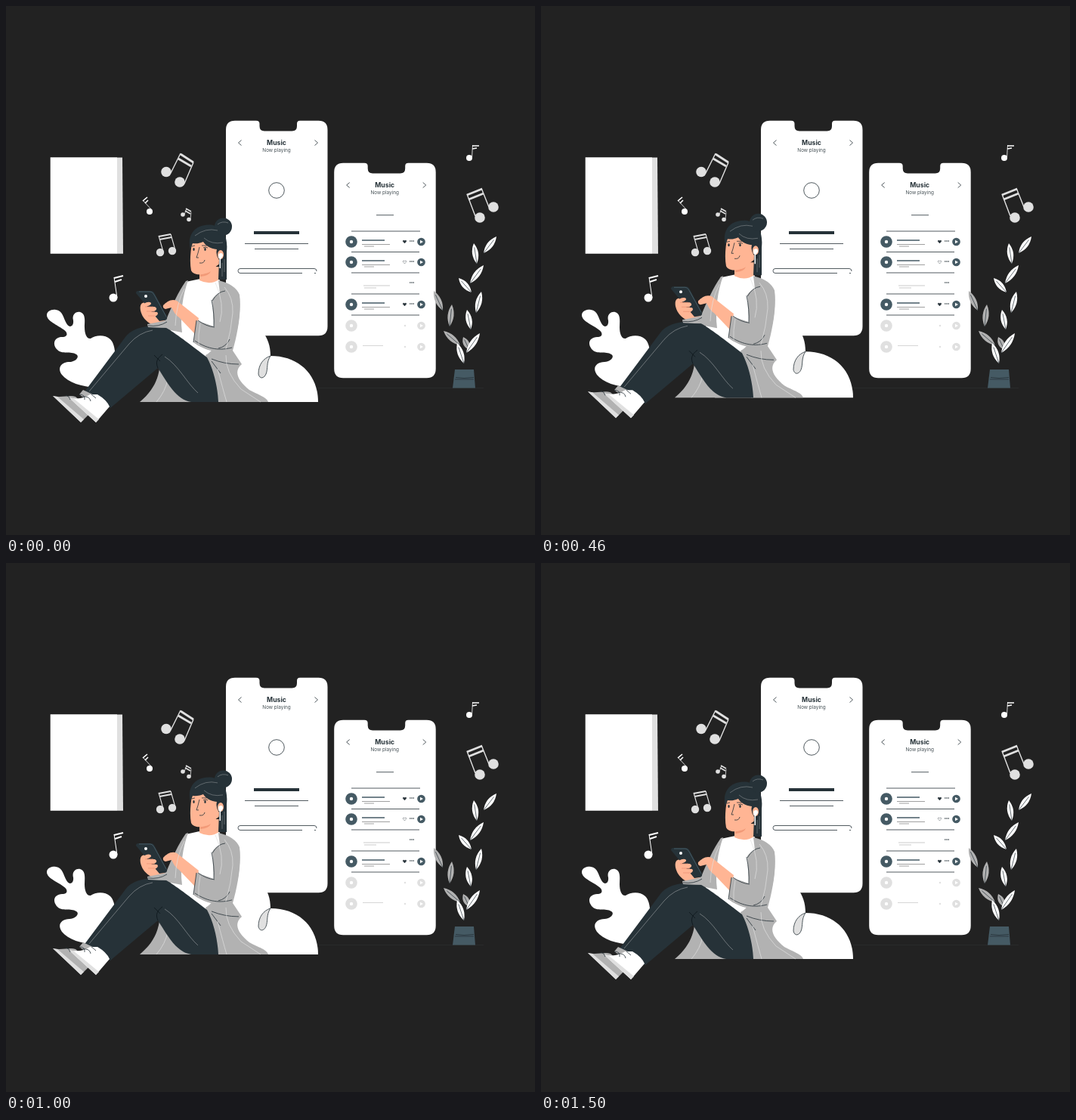
Write an HTML page that moves like this. It is 700 by 700 pixels and loops after 1.54 s.

```html
<!DOCTYPE html>
<html lang="en">
<head>
<meta charset="utf-8">
<style>
  html, body { margin: 0; width: 100%; height: 100%; overflow: hidden; background: #222; }
  svg { display: block; width: 100vw; height: 100vh; }
  text { font-family: Inter, "Open Sans", sans-serif; text-anchor: middle; fill: #263238; }
  .line { fill: none; stroke: #263238; stroke-width: .8; }
  .light { fill: none; stroke: #e0e0e0; stroke-width: .7; }
  .white { fill: #fff; }
  .pale { fill: #e0e0e0; }
  .gray { fill: #b2b2b2; }
  .dark { fill: #263238; }
  .skin { fill: #ffb594; }
</style>
</head>
<body>
<svg viewBox="0 0 700 700">
  <defs>
    <g id="phone">
      <path class="white" d="M303 151.800H331Q335.500 151.800 335.500 156V159Q335.500 165.500 342 165.500H378.500Q385 165.500 385 159V156Q385 151.800 389 151.800H413.500Q425.500 151.800 425.500 164V424Q425.500 436.200 413.500 436.200H303Q291 436.200 291 424V164Q291 151.800 303 151.800Z"/>
      <text x="358" y="184.100" font-size="8.700" font-weight="700">Music</text>
      <text x="358" y="192.500" font-size="6.400" fill-opacity=".85">Now playing</text>
      <path class="line" d="M311.500 177.500L307.500 181L311.500 184.500M408.500 177.500L412.500 181L408.500 184.500"/>
    </g>
  </defs>

  <path class="white" d="M58.700 200.300H147V327.700H58.700Z"/>
  <path class="pale" d="M147 200.500H154L155 327.700H147Z"/>
  <path d="M413 505.500H632" stroke="#2b2d2e" stroke-width=".8"/>

  <use href="#phone"/>
  <circle class="line" cx="358" cy="244" r="10.300"/>
  <path class="dark" d="M328 298H388V302H328Z"/>
  <path class="line" d="M316 314.500H400M329 321.500H387M392 353.500H310A3 3 0 0 1 310 347.500H408Q411 347.500 411 351M408 353.500H410"/>

  <use href="#phone" x="143.200" y="56"/>
  <path class="line" d="M490 276.700H513M457 298H548M457 325.500H547M457 353H547M457 381H547M457 409H547"/>
  <g id="rows"></g>

  <g id="notes"></g>
  <g id="leaves"></g>
  <path fill="#455a64" d="M594 481H619L621 505.500H591Z"/>
  <path class="line" d="M595 491.500L606 492.500L619 491.500M594 494H619"/>

  <path class="white" d="M66 402C75 403 76 413 80 420C84 427 90 424 89 416C87 409 92 404 98 405C106 407 104 418 104 425C104 434 107 441 112 440C118 436 130 434 138 441C146 449 146 470 140 485L120 505C100 504 82 498 74 488C67 478 74 471 84 471C92 471 98 464 93 461C86 456 74 462 67 454C60 445 66 437 76 438C82 437 82 432 76 428C68 422 54 417 54 409C54 404 60 401 66 402Z"/>

  <g id="listener">
    <path class="white" d="M300 385C337 425 350 437 350 463C388 463 413 488 413 524H230Z"/>
    <path class="pale" d="M350 463C341 466 334 474 334 487C336 495 342 492 344 487C347 480 344 472 350 463Z"/>
    <path class="line" d="M350 463C341 466 334 474 334 487C336 495 342 492 344 487C347 480 344 472 350 463"/>

    <path class="gray" d="M177 524C190 513 200 500 203 480L245 524Z"/>
    <path class="light" d="M199 524Q211 510 214 494"/>
    <path class="white" d="M238 365L257 361H282L292 385L285 480L215 440Q226 395 238 365Z"/>
    <path class="gray" d="M238 364C228 378 219 398 212 415L190 422V427L212 428L233 432C230 408 234 382 241 363Z"/>
    <path class="gray" d="M281 363Q303 368 309 382C312 405 306 435 300 456L312 474C300 484 308 497 322 508C332 514 345 517 347 524H278L264 462C288 450 286 400 281 363Z"/>

    <path class="dark" d="M102 513L158 438C166 426 188 421 208 424C218 428 244 448 266 465C275 482 280 504 281 524H245C225 521 214 499 201 479L138 532Z"/>
    <path class="light" opacity=".55" d="M110 510L163 447Q176 432 194 429M210 464C228 475 240 500 254 512"/>
    <path fill="none" stroke="#111b20" d="M201 479C198 472 199 467 207 461M204 470L196 462"/>

    <path class="gray" d="M62 516C74 519 84 514 92 517L114 536L99 551Z"/>
    <path class="pale" d="M62 516L68 517L103 547L99 551Z"/>
    <path class="gray" d="M97 514L102 508L117 515L108 522Z"/>
    <path class="white" d="M83 518C94 521 104 519 111 514H121Q133 521 137 530L119 551Z"/>
    <path class="pale" d="M83 518L89 519L123 547L119 551Z"/>
    <path class="line" d="M79 515Q84 516 85 521M97 514Q105 514 104 521M101 517Q111 516 112 523M113 514L119 519"/>

    <path class="skin" d="M256 345H282V362Q270 370 256 363Z"/>
    <path fill="#f29a78" d="M257 354Q265 355 271 351Q269 357 257 358Z"/>
    <path class="skin" d="M247 308Q242 335 245 350C249 358 264 356 271 350L284 340V312L268 302Z"/>
    <path class="dark" d="M244 322C239 303 250 289 270 289.500C288 291 294 306 292 325V362H281L282 336Q277 329 279 322C270 321 264 317 261 312Q254 315 247 314Z"/>
    <circle class="dark" cx="287.500" cy="292" r="11.500"/>
    <path class="light" opacity=".45" d="M250 304Q264 293 280 297M262 307Q272 316 287 313M280 289Q286 284 294 287M286 340V358M289 335V352"/>
    <ellipse class="skin" cx="284" cy="329" rx="4" ry="6"/>
    <path class="white" d="M281.500 328Q287 325 287 331L284 335L281 333Z"/>
    <path class="white" d="M282.500 333H284V347H282.500Z"/>
    <path class="line" d="M256 319Q254 328 252 333H255M256 340Q262 341 263 336M246 318L250 317M259 317L266 317"/>
    <ellipse class="dark" cx="248.500" cy="322" rx="1.200" ry="2"/>
    <ellipse class="dark" cx="263.500" cy="322" rx="1.200" ry="2"/>
    <path class="line" d="M261 320Q264 318 267 320"/>

    <path class="skin" d="M178 403Q176 392 185 392L198 399L211 416L198 424Q181 417 178 403Z"/>
    <path class="dark" d="M175 377H192Q195 377 197 381L213 411Q214 415 210 416L203 417L172 380Q172 377 175 377Z"/>
    <path fill="none" stroke="#455a64" d="M176 378H191Q194 378 196 382L212 411"/>
    <circle class="white" cx="185" cy="384" r="2"/>
    <path class="skin" d="M178 399Q184 390 191 392Q195 395 185 398L197 398Q202 401 196 404H187L200 405Q203 408 197 411L203 418L194 420Q181 414 178 399Z"/>
    <path fill="none" stroke="#e88f70" stroke-width=".7" d="M184 398L195 398M186 404H197M188 410H197"/>
    <path class="gray" d="M187 421Q198 419 212 416L218 426Q202 426 188 425Z"/>
    <path class="line" d="M188 423Q202 425 213 418"/>

    <path class="skin" d="M208 396C213 391 219 387 226 390L255 413L250 434L229 412C222 407 221 402 219 399L211 401Q207 400 208 396Z"/>
    <path class="gray" d="M273 388C283 373 306 372 309 385C311 415 304 441 297 454C278 463 257 452 248 445L252 416L275 424Z"/>
    <path class="line" d="M252 416L248 445M254 416Q265 424 276 425M275 424Q276 408 272 389M250 443C268 455 284 456 299 452M281 453Q291 451 296 441M272 467Q289 474 308 474M272 470L284 486M273 390Q280 378 290 377"/>
    <path class="light" d="M257 420Q254 436 255 448M289 372Q301 386 300 406Q298 430 291 454M291 462Q290 485 311 507L337 524M280 480Q287 507 292 524M236 374Q225 395 224 423M277 366Q290 395 283 418"/>
  </g>
</svg>
<script>
const el = id => document.getElementById(id);
const circle = (x, y, r, fill) => `<circle cx="${x}" cy="${y}" r="${r}" fill="${fill}"/>`;
const stroke = (d, color, width) => `<path d="${d}" fill="none" stroke="${color}" stroke-width="${width}"/>`;

// Track list row: liked, plain, empty or faded
function row(y, kind) {
  const color = kind === 'faded' ? '#e0e0e0' : '#455a64';
  let out = '';
  if (kind !== 'empty') {
    out += circle(457, y, 7.8, color) + circle(457, y, 2.2, '#fff') + circle(549.5, y, 5.3, color)
      + `<path class="white" d="M548 ${y - 2.3}L552 ${y}L548 ${y + 2.3}Z"/>`;
  }
  if (kind === 'faded') return out + circle(528, y, 1.2, color);
  out += [534.8, 537, 539.2].map(x => circle(x, y - 1, .8, '#263238')).join('');
  if (kind === 'empty') return out + stroke(`M473 ${y + 3}H508M474 ${y + 6}H490`, '#aaa', .6);
  return out + stroke(`M471 ${y - 2}H501`, color, 1.5)
    + stroke(`M471 ${y + 3.5}H508M474 ${y + 6}H487`, '#777', .7)
    + `<path d="M527.500 ${y + 2}l-2.300-2.600q0-2.400 2.300-.8q2.300-1.600 2.300 .8Z"
        fill="${kind === 'liked' ? '#263238' : '#fff'}" stroke="#263238" stroke-width=".4"/>`;
}
el('rows').innerHTML = row(312, 'liked') + row(339, 'plain') + row(367, 'empty')
  + row(395, 'liked') + row(423, 'faded') + row(451, 'faded')
  + stroke('M472 449.5H499', '#ccc', .8);

function note(heads, r, color, stems, beams, width) {
  return heads.map(([x, y]) => circle(x, y, r, color)).join('')
    + stroke(stems, color, width) + stroke(beams, color, width * 2);
}
el('notes').innerHTML =
  note([[212, 219.5], [230, 233]], 6.8, '#e0e0e0', 'M218 221L231 195M236 235L248 207', 'M231 196L248 207M228 202L245 212', 1.4)
  + note([[190, 272]], 4, '#fff', 'M193 270L181 257', 'M181 258L187 253M184 261L188 257', .8)
  + note([[234, 276], [242, 282.5]], 2.8, '#e0e0e0', 'M236 276L239 268M244 282L245 273', 'M238 268L245 272M237 271L244 275', .8)
  + note([[204, 326], [220, 324]], 5.2, '#e0e0e0', 'M208 325L202 304M224 323L218 302', 'M202 305L218 302M203 309L219 306', 1.1)
  + note([[142, 386]], 5.5, '#fff', 'M147 386L143 359', 'M143 360L155 357M144 365L153 362', 1)
  + note([[613, 201]], 4, '#fff', 'M616.500 201L617.500 184', 'M617 185L626 185M617 189L623 188', .8)
  + note([[627, 280], [645, 266]], 6.8, '#e0e0e0', 'M621 278L610 249M639 266L629 241', 'M610 250L630 242M612 256L632 248', 1.4);

function leaf([x, y, tipX, tipY, fill = '#fff']) {
  const dx = tipX - x, dy = tipY - y, len = Math.hypot(dx, dy);
  const nx = -dy / len * 8, ny = dx / len * 8;
  const mx = x + dx * .5, my = y + dy * .5;
  return `<path d="M${x} ${y}Q${mx + nx} ${my + ny} ${tipX} ${tipY}Q${mx - nx} ${my - ny} ${x} ${y}Z" fill="${fill}"/>`
    + stroke(`M${x} ${y}L${x + dx * .8} ${y + dy * .8}`, '#263238', .7);
}
el('leaves').innerHTML = [
  [632, 327, 649, 305], [623, 341, 619, 314], [614, 367, 632, 343], [616, 379, 599, 360],
  [622, 406, 629, 378], [615, 428, 610, 402], [578, 403, 566, 377, '#b2b2b2'],
  [587, 424, 590, 395, '#b2b2b2'], [601, 449, 579, 430, '#b2b2b2'], [613, 455, 605, 438, '#b2b2b2'],
  [609, 459, 627, 433], [606, 473, 597, 446]
].map(leaf).join('');

const LOOP = 1540, STEPS = 37, PEAK = 742, LIFT = 9;

// Rise and fall: nearly linear, softened a little at both ends
function lift(t) {
  const p = Math.max(0, 1 - Math.abs(t - PEAK) / PEAK);
  return LIFT * (.7 * p + .3 * (1 - Math.cos(Math.PI * p)) / 2);
}
function draw() {
  const step = Math.floor(performance.now() % LOOP * STEPS / LOOP + .08);
  el('listener').setAttribute('transform', `translate(0 ${-lift(step * LOOP / STEPS)})`);
  requestAnimationFrame(draw);
}
draw();
</script>
</body>
</html>
```
